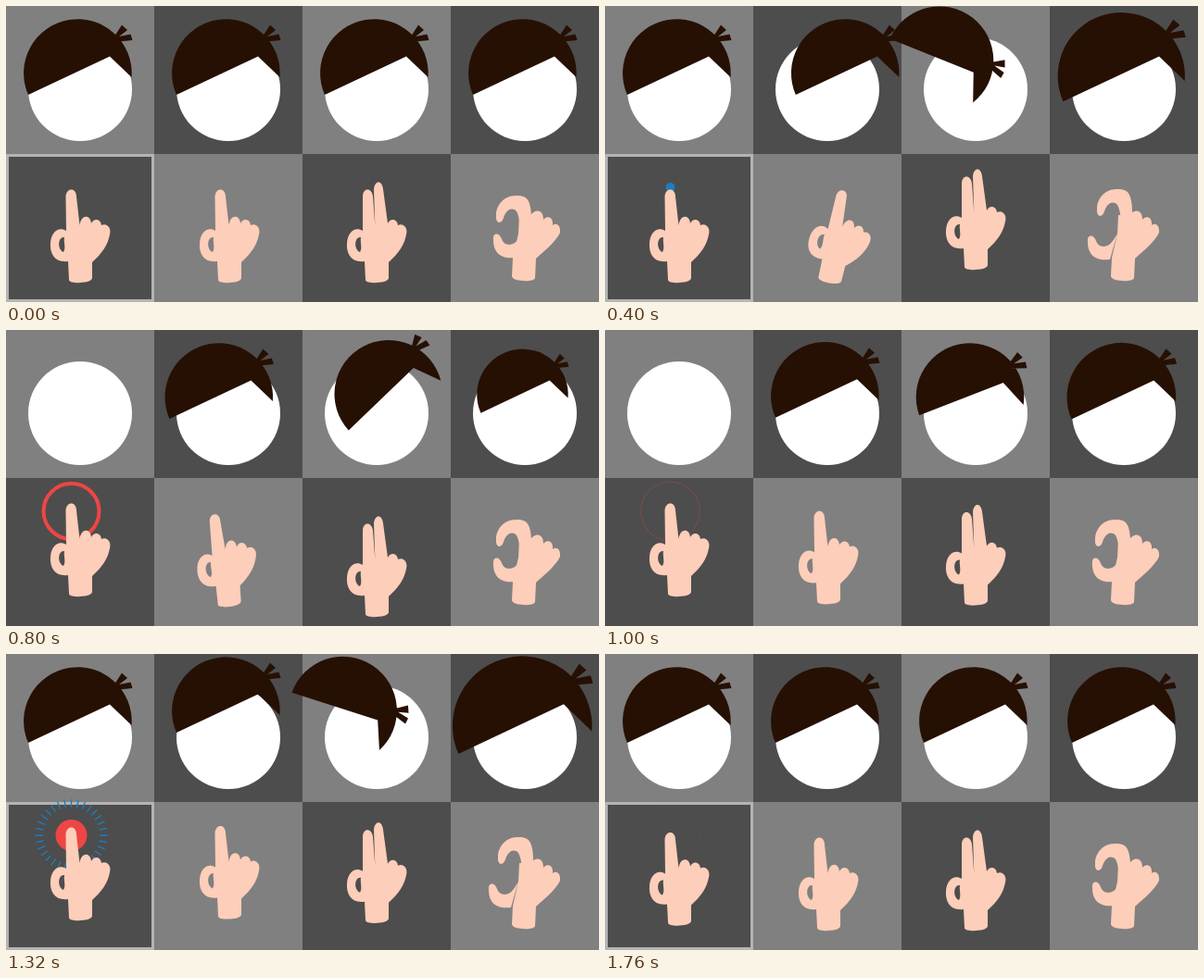
Recreate the animation shown at these times as an HTML page with a canvas. Size 640 by 320 pixels, loop 1800 ms.

```html
<!DOCTYPE html>
<html lang="en">
<head>
<meta charset="utf-8">
<title>Touch gestures</title>
<style>
html, body { margin: 0; width: 100%; height: 100%; overflow: hidden; background: #4d4d4d; }
canvas { display: block; }
</style>
</head>
<body>
<canvas id="stage" width="640" height="320"></canvas>
<script>
const ctx = document.getElementById('stage').getContext('2d');
const LOOP = 1800, STEP = 40, RAYS = 32, TAU = 2 * Math.PI;
const HAIR = '#261004', SKIN = '#fdceb9', BLUE = '#1c7fbd', RED = '#ef4545';
const TIP = [70.5, 196];

// All shapes are drawn relative to the corner of a 160 px cell.
const hair = new Path2D('M24 96A58.3 58.3 0 1 1 135.5 77L112 54.5Z' +
  'M115 36L125 20.5L131 26L122 33L134.5 30.5L136.5 37L116 39Z');

const palm = 'C95 69 102 70 103 77C109 74 114 80 112 87C110 98 104 107 93 117L93 134' +
  'C93 140 68 141 68 136L67 116C53 118 47 108 48 96C49 84 57 78 65 83Z' +
  'M63 90C56 89 55 103 62 106C65 102 62 95 63 90Z';
const oneFinger = new Path2D('M64.5 46C65 36 76 36 76 46L79.5 77C81 65 91 65 92 75' + palm);
const twoFingers = new Path2D('M65 46C65 36 75 36 76 46L78.3 77L77 38C78 28 86 28 87 38L92 75' + palm);

const pinchPalm = new Path2D('M86 66L74 66L73 86L67 112L66 132C66 138 90 139 91 134L92 113' +
  'C101 105 114 94 118 85C119 76 113 74 110 77C111 68 104 66 100 71C100 61 93 58 86 66Z');
const pinchFinger = new Path2D('M87 78C88 46 81 45 70 45C57 45 49 56 49 66C48 76 55 76 57 69' +
  'C60 60 66 57 71 62C74 68 75 75 74 85Z');
const pinchThumb = new Path2D('M78 84C72 95 68 98 63 98C59 98 56 95 55 92' +
  'C53 85 45 84 46 93C46 105 52 114 70 112Z');

const clamp = p => Math.min(1, Math.max(0, p));
const ease = p => (1 - Math.cos(Math.PI * clamp(p))) / 2;

// Moves from rest to a peak, over to a trough and back to rest.
function swing(t, peak, trough, peakAt, troughAt = 590, end = 820) {
  return peak * ease(t / peakAt)
    + (trough - peak) * ease((t - peakAt) / (troughAt - peakAt))
    - trough * ease((t - troughAt) / (end - troughAt));
}

function shape(path, color, x, y, { pivot = [0, 0], angle = 0, scale = 1 } = {}) {
  ctx.save();
  ctx.translate(x + pivot[0], y + pivot[1]);
  ctx.rotate(angle * Math.PI / 180);
  ctx.scale(scale, scale);
  ctx.translate(-pivot[0], -pivot[1]);
  ctx.fillStyle = color;
  ctx.fill(path);
  ctx.restore();
}

function drawCells() {
  for (let i = 0; i < 8; i++) {
    const col = i % 4, row = i >> 2;
    ctx.fillStyle = (col + row) % 2 ? '#4d4d4d' : '#808080';
    ctx.fillRect(col * 160, row * 160, 160, 160);
  }
  ctx.fillStyle = '#fff';
  for (let col = 0; col < 4; col++) {
    ctx.beginPath();
    ctx.arc(col * 160 + 80, 90, 56, 0, TAU);
    ctx.fill();
  }
}

function drawBurst(age) {
  const outer = 5 + 34 * ease((age - 60) / 180);
  const inner = Math.max(0, outer - 12 * (1 - (age / 440) ** 2));
  ctx.strokeStyle = BLUE;
  ctx.lineWidth = 1.3;
  ctx.beginPath();
  for (let i = 0; i < RAYS; i++) {
    const c = Math.cos(i * TAU / RAYS), s = Math.sin(i * TAU / RAYS);
    ctx.moveTo(TIP[0] + c * inner, TIP[1] + s * inner);
    ctx.lineTo(TIP[0] + c * outer, TIP[1] + s * outer);
  }
  ctx.stroke();
}

function drawRing(age) {
  const radius = 32 * (1 - (1 - clamp((age - 200) / 180)) ** 3);
  const width = Math.min(radius, 14 * (1 - (age - 200) / 520) ** 2);
  ctx.strokeStyle = RED;
  ctx.lineWidth = width;
  ctx.beginPath();
  ctx.arc(...TIP, radius - width / 2, 0, TAU);
  ctx.stroke();
}

function drawTap(t) {
  const age = t < 1080 ? t - 360 : t - 1080;
  const selected = t < 510 || t >= 1230;
  if (selected) {
    shape(hair, HAIR, 0, 0);
    ctx.strokeStyle = '#b4b4b4';
    ctx.lineWidth = 3;
    ctx.strokeRect(1.5, 161.5, 157, 157);
  }
  if (age > 0 && age < 440) drawBurst(age);
  if (age > 200 && age < 720) drawRing(age);
  const lift = ease((age - 80) / 120) - ease((age - 640) / 80);
  shape(oneFinger, SKIN, 0, 160 - 11 * lift);
}

function drawPan(first, second) {
  const hairX = swing(first, 22, -14, 295, 590, 780);
  const hairY = swing(second, -14, 7, 310);
  const angle = swing(first, 14.5, -14, 270, 560, 740);
  const handY = swing(second, -22.5, 15, 270);
  shape(hair, HAIR, 160 + hairX, hairY);
  shape(oneFinger, SKIN, 161, 160 + handY, { pivot: [80, 140], angle });
}

function drawRotate(phase) {
  const angle = swing(phase, 50, -28, 330);
  const handY = swing(phase, -14, 15.5, 290, 600);
  shape(hair, HAIR, 320, 0, { pivot: [75, 24], angle });
  shape(twoFingers, SKIN, 320, 160 + handY);
}

function drawScale(t) {
  const phase = t < 950 ? t - 160 : t - 950;
  const growth = swing(phase, 0.31, -0.165, 440, 660, 790);
  const open = ease(growth / 0.12);
  shape(hair, HAIR, 480, 0, { pivot: [78, 55], scale: 1 + growth });
  shape(pinchPalm, SKIN, 480, 160);
  shape(pinchFinger, SKIN, 480 + 2 * open, 160 - 7 * open);
  shape(pinchThumb, SKIN, 480 - 5 * open, 160 + 2 * open);
}

function draw(now) {
  const time = now % LOOP, t = time - time % STEP;
  const first = t - 120, second = t - 940;
  drawCells();
  drawTap(t);
  drawPan(first, second);
  drawRotate(second < 0 ? first : second);
  drawScale(t);
}

const begin = performance.now();
function frame() {
  draw(performance.now() - begin);
  requestAnimationFrame(frame);
}
frame();
</script>
</body>
</html>
```
